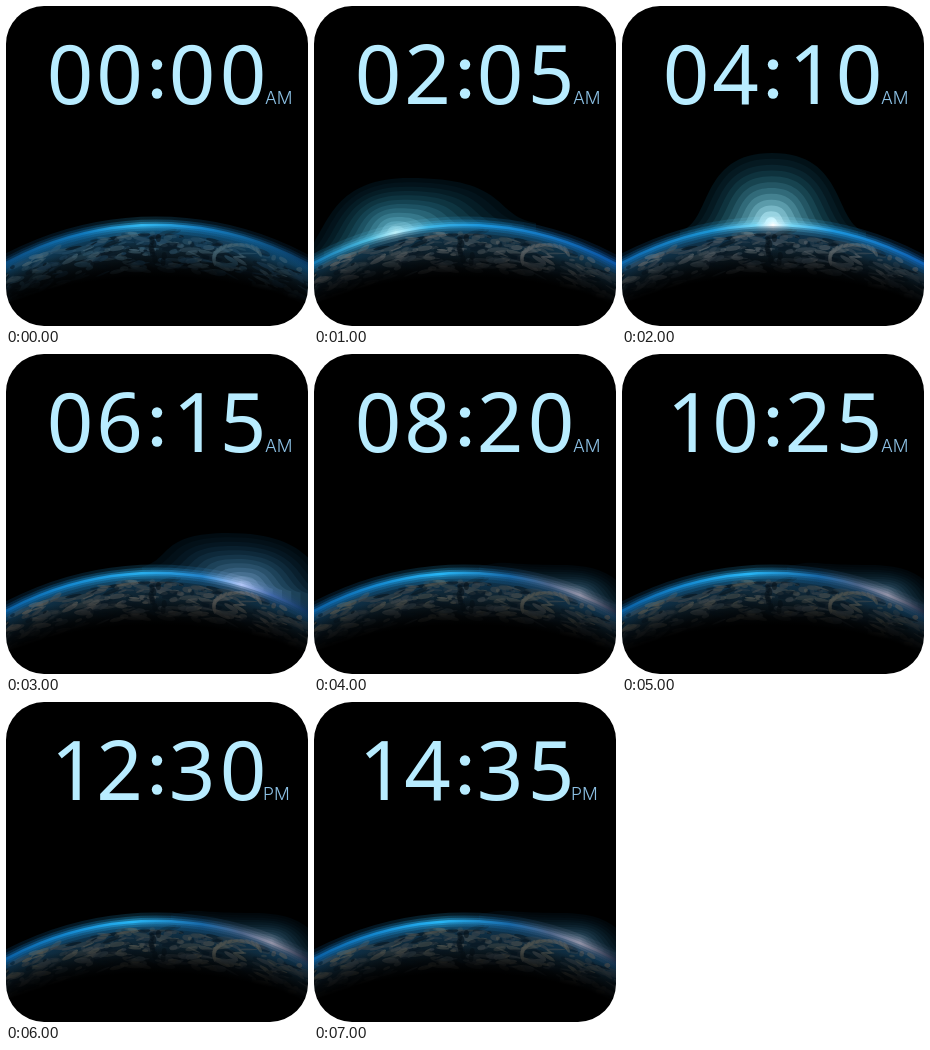
Write an HTML page with a canvas that moves like this. It is 302 px wide and 320 px high and loops after 8 s.

```html
<!DOCTYPE html>
<html lang="en">
<head>
<meta charset="utf-8">
<style>
  html, body { margin: 0; width: 302px; height: 320px; overflow: hidden; background: #fff; }
  canvas, svg { position: absolute; left: 0; top: 0; }
  canvas { border-radius: 38px; }
  #digits { font: 400 81.5px "Noto Sans", "Open Sans", sans-serif; fill: #b8ecff; text-anchor: middle; }
  #half { font: 300 17.5px Inter, "Open Sans", sans-serif; fill: #8cc0e4; }
</style>
</head>
<body>
<canvas id="sky" width="302" height="320"></canvas>
<svg width="302" height="320">
  <g id="digits">
    <text y="98"></text><text y="98"></text><text y="98"></text><text y="98"></text>
    <circle cx="151" cy="58.5" r="5.2"/><circle cx="151" cy="87.5" r="5.2"/>
  </g>
  <text id="half" y="98"></text>
</svg>
<script>
const ctx = document.getElementById('sky').getContext('2d');
const digits = document.querySelectorAll('#digits text');
const half = document.getElementById('half');
const centers = [64, 113.5, 186, 237];
const EARTH = { x: 150, y: 534, r: 315 };
const limbY = x => EARTH.y - Math.sqrt(EARTH.r ** 2 - (x - EARTH.x) ** 2);

// limb: colour stops along the horizon; glow: left foot, peak, right foot
const phases = [
  { limb: [[0, '#0c4c80'], [.25, '#1078bc'], [.45, '#34bcf4'], [.65, '#1680c4'], [1, '#0a3860']],
    land: ['#2c5268', '#1f4560', '#456474'], sea: '#0d4a72' },
  { limb: [[0, '#1278b4'], [.18, '#4cbce0'], [.27, '#c0f2fc'], [.38, '#40b8e8'], [.55, '#1c98e0'], [1, '#0b54a4']],
    land: ['#424e55', '#33444f', '#5b6265'], sea: '#0f3c58',
    glow: { sun: [80, 224], left: [-25, 256], peak: [95, 172], right: [222, 217], tint: [150, 224, 245], power: .85 } },
  { limb: [[0, '#0e68b0'], [.3, '#1c98d8'], [.44, '#78d8f6'], [.5, '#fff'], [.56, '#78d8f6'], [.7, '#1c98e0'], [1, '#0e60b4']],
    land: ['#3f4d56', '#314350', '#5a646a'], sea: '#0f3c5c',
    glow: { sun: [149, 217], left: [58, 225], peak: [150, 147], right: [244, 226], tint: [190, 242, 255], power: 1 } },
  { limb: [[0, '#0b60a4'], [.2, '#1488d0'], [.45, '#28b0f0'], [.65, '#2484cc'], [.78, '#b4c8f8'], [.88, '#4068a8'], [1, '#0c3058']],
    land: ['#41484b', '#344048', '#575957'], sea: '#0e3a58',
    glow: { sun: [239, 231], left: [136, 213], peak: [222, 179], right: [350, 246], tint: [190, 205, 250], power: .75 } },
  { limb: [[0, '#0b60a4'], [.2, '#1488d0'], [.42, '#28b8f8'], [.65, '#1868a8'], [.78, '#4c6488'], [.88, '#9494a8'], [1, '#1c2840']],
    land: ['#3d464b', '#323f48', '#50544f'], sea: '#0e3a5a',
    glow: { sun: [264, 239], left: [165, 213], peak: [248, 211], right: [340, 262], tint: [165, 165, 195], power: .6 } }
];

function randomFrom(seed) {
  return () => (seed = (seed * 16807) % 2147483647) / 2147483647;
}

function drawGlow({ sun, left, peak, right, tint, power }) {
  const bands = 12;
  for (let i = 0; i < bands; i++) {
    const k = 1 - i / bands;
    const at = (x, y) => [sun[0] + (x - sun[0]) * k, sun[1] + (y - sun[1]) * k];
    const curve = (a, b, c) => ctx.bezierCurveTo(...at(...a), ...at(...b), ...at(...c));
    const spanL = peak[0] - left[0], spanR = right[0] - peak[0];
    const t = (i + 1) / bands;
    const light = power * (.07 + .93 * t ** 1.55);
    const [r, g, b] = [1.8, 1.1, 1].map((gamma, c) => Math.round(tint[c] * light ** gamma));
    ctx.fillStyle = `rgb(${r},${g},${b})`;
    ctx.beginPath();
    ctx.moveTo(...at(left[0], left[1] + 60));
    ctx.lineTo(...at(...left));
    curve([left[0] + spanL * .35, left[1] - 8], [left[0] + spanL * .2, peak[1]], peak);
    curve([right[0] - spanR * .2, peak[1]], [right[0] - spanR * .35, right[1] - 8], right);
    ctx.lineTo(...at(right[0], right[1] + 60));
    ctx.fill();
  }
}

function blob(x, y, rx, ry, angle, color, alpha) {
  ctx.globalAlpha = alpha;
  ctx.fillStyle = color;
  ctx.beginPath();
  ctx.ellipse(x, y, rx, ry, angle, 0, 2 * Math.PI);
  ctx.fill();
  ctx.globalAlpha = 1;
}

function drawSurface({ land, sea }) {
  const rand = randomFrom(4127);
  const shade = ctx.createRadialGradient(EARTH.x, EARTH.y, EARTH.r - 55, EARTH.x, EARTH.y, EARTH.r);
  shade.addColorStop(0, '#060b0f');
  shade.addColorStop(.6, '#0f2431');
  shade.addColorStop(1, sea);
  ctx.fillStyle = shade;
  ctx.fillRect(0, 200, 302, 120);

  for (let i = 0; i < 380; i++) {
    const x = rand() * 312 - 5, depth = 7 + rand() * 38;
    const slope = Math.asin((x - EARTH.x) / EARTH.r);
    const color = rand() < .25 ? '#0a1a26' : land[Math.floor(rand() * 3)];
    blob(x, limbY(x) + depth, 2 + rand() * 9, .7 + rand() * 2.2,
      slope + (rand() - .5) * .7, color, .35 + rand() * .45);
  }
  // cloud swirl on the right
  for (let i = 0; i < 12; i++) {
    const a = 3 + i * .25;
    blob(232 + 24 * Math.cos(a), 252 + 13 * Math.sin(a), 6, 1.8, a + 1.6, land[2], .6);
  }
  for (let i = 0; i < 9; i++) blob(145 + rand() * 14, 232 + i * 3, 2.5, 4, 0, '#08131b', .6);

  // night side
  ctx.save();
  ctx.translate(150, 350);
  ctx.scale(215, 88);
  const night = ctx.createRadialGradient(0, 0, .9, 0, 0, 1.22);
  night.addColorStop(0, '#000');
  night.addColorStop(.3, 'rgba(0,0,0,.75)');
  night.addColorStop(1, 'rgba(0,0,0,0)');
  ctx.fillStyle = night;
  ctx.fillRect(-2, -2, 4, 4);
  ctx.restore();
}

function drawScene(phase) {
  ctx.fillStyle = '#000';
  ctx.fillRect(0, 0, 302, 320);
  if (phase.glow) drawGlow(phase.glow);

  const horizon = new Path2D();
  horizon.arc(EARTH.x, EARTH.y, EARTH.r, 0, 2 * Math.PI);
  ctx.save();
  ctx.clip(horizon);
  drawSurface(phase);
  ctx.restore();

  const light = ctx.createLinearGradient(0, 0, 302, 0);
  phase.limb.forEach(stop => light.addColorStop(...stop));
  ctx.strokeStyle = light;
  for (const [width, alpha] of [[17, .17], [11, .25], [6.5, .4], [2.6, .95]]) {
    ctx.lineWidth = width;
    ctx.globalAlpha = alpha;
    ctx.stroke(horizon);
  }
  ctx.globalAlpha = 1;
}

function showTime(minutes) {
  const pad = n => String(n).padStart(2, '0');
  [...pad(Math.floor(minutes / 60)) + pad(minutes % 60)].forEach((d, i) => {
    digits[i].textContent = d;
    digits[i].setAttribute('x', centers[i] + (d === '1' ? 4 : 0));
  });
  const pm = minutes >= 720;
  half.textContent = pm ? 'PM' : 'AM';
  half.setAttribute('x', pm ? 257 : 259);
}

let shown = -1;
const start = performance.now();
function tick() {
  const step = Math.floor((performance.now() - start) / 1000) % 8;
  if (step !== shown) {
    shown = step;
    drawScene(phases[Math.min(step, 4)]);
    showTime(step * 125);
  }
  requestAnimationFrame(tick);
}
tick();
</script>
</body>
</html>
```
